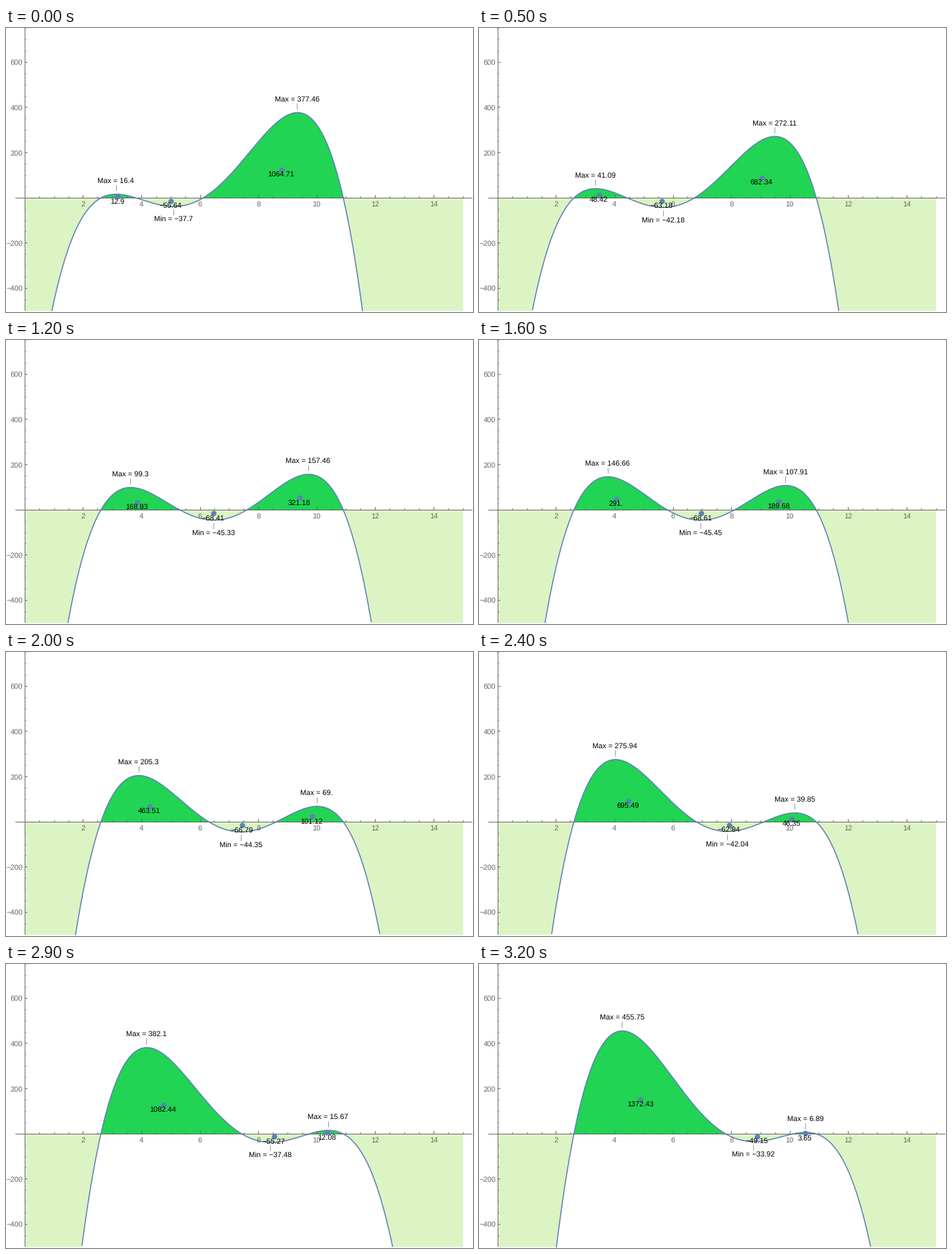
Animation, 700 px wide and 425 px high, one loop 3300 ms. Source, as a matplotlib script:

```python
import numpy as np
import matplotlib.pyplot as plt
from matplotlib.animation import FuncAnimation

plt.rcParams["font.family"] = "Liberation Sans"
plt.rcParams["text.hinting"] = "none"
plt.rcParams["path.snap"] = False

W, H, DPI = 700, 425, 100
PX = 72 / DPI                 # one pixel in points
X0, Y0 = 28.45, 254.25        # data origin in pixels
SX, SY = 43.77, 0.3382        # pixels per data unit
FRAMES = 33
FLOOR = -500

BLUE, GREEN, PALE = "#5e81b5", "#21d453", "#dcf4c3"
AXIS, LEADER = "#666666", "#999999"

fig = plt.figure(figsize=(W / DPI, H / DPI), dpi=DPI, facecolor="white")
ax = fig.add_axes([0, 0, 1, 1])
ax.set_xlim(0, W)
ax.set_ylim(H, 0)
ax.axis("off")


def px(x):
    return X0 + SX * np.asarray(x)


def py(y):
    return Y0 - SY * np.asarray(y)


def crisp(v):
    """Centre of the pixel that holds v."""
    return np.floor(v) + 0.5


def line(xs, ys, color, width=1.0, z=4):
    return ax.plot(xs, ys, color=color, lw=width * PX, zorder=z,
                   solid_capstyle="butt")[0]


def label(x, y, text="", color="black", ha="center", z=7):
    return ax.text(x, y, text, color=color, ha=ha, va="baseline",
                   fontsize=11 * PX, zorder=z)


def number(v):
    return f"{v:.2f}".rstrip("0").replace("-", "\u2212")


def draw_axes():
    line([14, 699], [254.5, 254.5], AXIS)
    line([28.5, 28.5], [0, 423], AXIS)
    for i in range(1, 31):
        major = i % 4 == 0
        x = float(px(i / 2))
        line([crisp(x)] * 2, [254, 250 if major else 252], AXIS)
        if major:
            label(x - 0.4, 267, str(i // 2), AXIS, z=5)
    for v in range(-450, 751, 50):
        if v == 0:
            continue
        major = v % 200 == 0
        y = float(py(v))
        line([29, 32 if major else 30], [crisp(y)] * 2, AXIS)
        if major:
            label(25.3, y + 3.8, str(v).replace("-", "\u2212"), AXIS, "right", 5)


draw_axes()

xs = np.linspace(0, 15, 1501)
pale = ax.fill([0], [0], color=PALE, lw=0, zorder=1)[0]
green = ax.fill([0], [0], color=GREEN, lw=0, zorder=1)[0]
curve = line([], [], BLUE, 1.6, 3)
dots = ax.plot([], [], "o", color=BLUE, ms=8 * PX, mew=0, zorder=6)[0]
areas = [label(0, 0) for _ in range(3)]
peaks = [label(0, 0) for _ in range(3)]
leaders = [line([], [], LEADER) for _ in range(3)]


def fill_to_axis(patch, ys):
    x = np.r_[0, xs, 15]
    patch.set_xy(np.column_stack([px(x), py(np.r_[0, ys, 0])]))


def update(i):
    b = 3.8 + i / 8
    zeros = [2.6, b, b + 2.3, 10.9]
    p = -2 * np.poly1d(zeros, r=True)
    total = p.integ()
    ys = p(xs)

    fill_to_axis(pale, np.clip(ys, FLOOR, 0))
    fill_to_axis(green, np.maximum(ys, 0))
    curve.set_data(px(xs), py(np.where(ys < FLOOR - 2, np.nan, ys)))

    # Turning points are located to two decimals.
    turns = np.round(np.sort(np.real(p.deriv().roots)), 2)
    centres = []
    for k, x in enumerate(turns):
        lo, hi, v = zeros[k], zeros[k + 1], p(x)

        # Dot at the centroid of the triangle: two zeros and the turning point.
        dx, dy = float(px((lo + hi + x) / 3)), float(py(v / 3))
        centres.append((dx, dy))
        areas[k].set_text(number(total(hi) - total(lo)))
        areas[k].set_position((dx - 0.5, dy + 10.2))

        cx, cy = float(px(x)), float(py(v))
        low = k == 1
        side = 1 if low else -1
        leaders[k].set_data([crisp(cx)] * 2, [cy + side * 4.5, cy + side * 13.5])
        peaks[k].set_text(f"{'Min' if low else 'Max'} = {number(v)}")
        peaks[k].set_position((cx - 0.5, cy + (23.3 if low else -16.8)))
    dots.set_data(*zip(*centres))
    return [pale, green, curve, dots, *areas, *peaks, *leaders]


anim = FuncAnimation(fig, update, frames=FRAMES, interval=100,
                     repeat=True, repeat_delay=0, blit=False)
plt.show()
```
